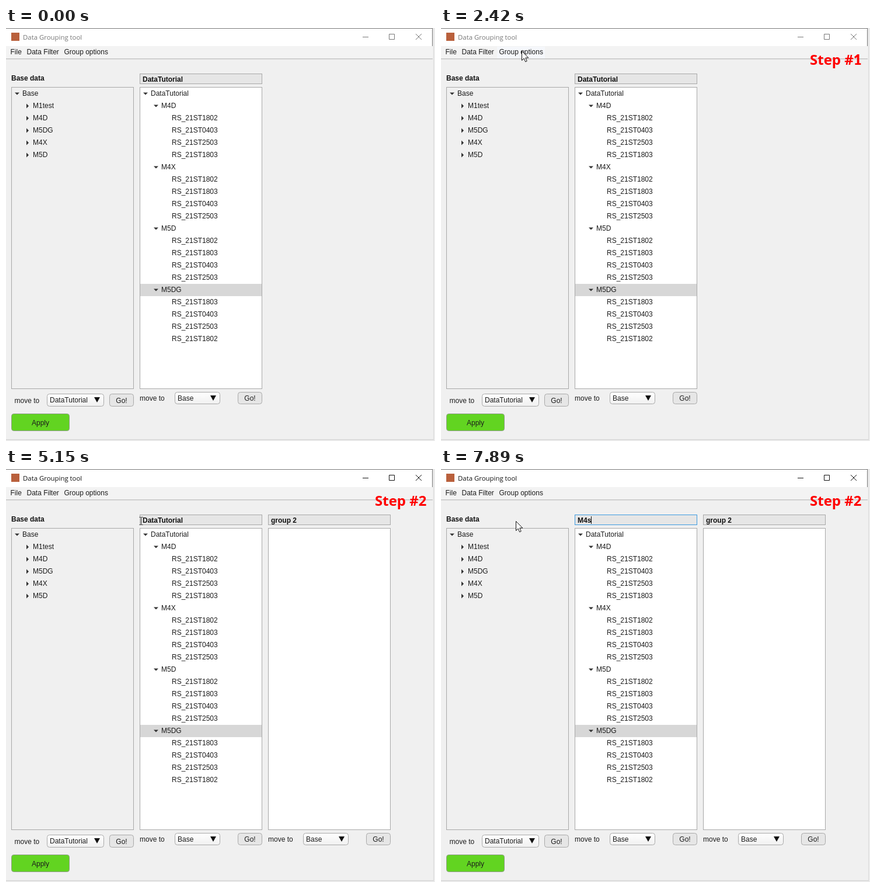
An HTML page that plays this animation: 735 by 707 pixels, repeating every 8 s.

```html
<!DOCTYPE html>
<html lang="en">
<head>
<meta charset="utf-8">
<title>Data Grouping tool</title>
<style>
  html, body { margin: 0; width: 100%; height: 100%; overflow: hidden; background: #fff; }
  svg { display: block; width: 735px; height: 707px; }
  text { font: 12px "Liberation Sans", Arial, sans-serif; fill: #1c1c1c; white-space: pre; }
  .bold { font-weight: bold; fill: #111; }
  .title { font: 11.4px "Open Sans", "Noto Sans", sans-serif; }
  .step { font: bold 24px "Open Sans", "Noto Sans", sans-serif; fill: #f00; }
  .foot { font-family: Lato, sans-serif; font-weight: 900; }
</style>
</head>
<body>
<svg id="stage" viewBox="0 0 735 707">
  <defs>
    <linearGradient id="side"><stop stop-color="#cfcfcf"/><stop offset="1" stop-color="#f6f6f6"/></linearGradient>
    <linearGradient id="under" x2="0" y2="1"><stop stop-color="#cfcfcf"/><stop offset="1" stop-color="#f6f6f6"/></linearGradient>
    <linearGradient id="drop" x2="0" y2="1"><stop stop-color="#fff"/><stop offset="1" stop-color="#f0f0f0"/></linearGradient>
  </defs>
</svg>
<script>
const LOOP = 8000;
const stage = document.getElementById('stage');

function add(parent, tag, attrs, content) {
  const el = document.createElementNS('http://www.w3.org/2000/svg', tag);
  for (const key in attrs) el.setAttribute(key, attrs[key]);
  if (content !== undefined) el.textContent = content;
  parent.appendChild(el);
  return el;
}
const group = (parent = stage) => add(parent, 'g', {});
const rect = (p, x, y, width, height, fill, extra) =>
  add(p, 'rect', { x, y, width, height, fill, ...extra });
const frame = (p, x, y, w, h, fill, stroke, rx = 0) =>
  rect(p, x + .5, y + .5, w - 1, h - 1, fill, { stroke, rx });
const label = (p, x, y, content, cls = '', extra) =>
  add(p, 'text', { x, y, class: cls, ...extra }, content);
const path = (p, d, extra) => add(p, 'path', { d, ...extra });
const show = (el, on) => el.setAttribute('visibility', on ? 'visible' : 'hidden');

// Window
rect(stage, 731, 0, 4, 707, 'url(#side)');
rect(stage, 0, 704, 733, 3, 'url(#under)');
rect(stage, 0, 0, 732, 704, '#f0f0f0');
rect(stage, 0, 0, 731, 31, '#fff');
rect(stage, 0, 0, 731, 1, '#777');
rect(stage, 730, 0, 1, 31, '#777');
rect(stage, 0, 31, 731, 21, '#f3f3f3');
rect(stage, 0, 52, 731, 1.5, '#c6c6c6');
rect(stage, 9, 8, 14, 14, '#b9603c');
const title = label(stage, 29, 20, 'Data Grouping tool', 'title');
const controls = path(stage, 'M611 15.5H621M656.5 10.5H665.5V19.5H656.5ZM702 10L712 20M712 10L702 20', { fill: 'none' });

// Menu bar
const menuHover = rect(stage, 96, 32, 82, 20, '#f5f7fb');
const menuOpen = rect(stage, 96, 31, 83, 21, '#a5d8fb');
label(stage, 7.5, 45, 'File');
label(stage, 35.5, 45, 'Data Filter');
label(stage, 99.5, 45, 'Group options');

// Trees
const rowMid = i => 112 + 21 * i;
function node(p, x, i, name, open) {
  const y = rowMid(i);
  if (open !== undefined) {
    const d = open ? `M${x - 13} ${y - 1.5}h8l-4 4z` : `M${x - 11} ${y - 3.5}v8l4 -4z`;
    path(p, d, { fill: '#333' });
  }
  label(p, x, y + 4, name);
}

function dropdown(p, x, y, w, h, name) {
  frame(p, x, y, w, h, 'url(#drop)', '#a9a9a9', 4);
  label(p, x + 5, y + 14.5, name);
  path(p, `M${x + w - 17} ${y + 6}h10l-5 9z`, { fill: '#111' });
}
function button(p, x, y, w, h, name, fill, stroke) {
  frame(p, x, y, w, h, fill, stroke, 4);
  label(p, x + w / 2, y + h / 2 + 4.5, name, '', { 'text-anchor': 'middle' });
}
function groupPanel(p, x) {
  const field = frame(p, x, 78, 210, 18, '#e6e6e6', '#a8a8a8');
  frame(p, x, 101, 210, 517, '#fff', '#a8a8a8');
  label(p, x, 638, 'move to');
  dropdown(p, x + 60, 623, 78, 21, 'Base');
  button(p, x + 168, 623, 42, 21, 'Go!', '#e6e6e6', '#a9a9a9');
  return field;
}

label(stage, 9, 90, 'Base data', 'bold');
frame(stage, 9, 101, 210, 517, '#f0f0f0', '#a8a8a8');
label(stage, 14.5, 642, 'move to');
dropdown(stage, 70, 626, 98, 22, 'DataTutorial');
button(stage, 177, 626, 42, 22, 'Go!', '#e6e6e6', '#a9a9a9');
button(stage, 9, 660, 100, 30, 'Apply', '#62d421', '#8f9d88');

const field = groupPanel(stage, 229);
rect(stage, 230, 438, 208, 21, '#d7d7d7');
const hover = rect(stage, 0, 0, 208, 21, '#e4e4e4');

node(stage, 28, 0, 'Base', true);
['M1test', 'M4D', 'M5DG', 'M4X', 'M5D'].forEach((name, i) => node(stage, 46, i + 1, name, false));

const sets = {
  M4D: ['1802', '0403', '2503', '1803'],
  M4X: ['1802', '1803', '0403', '2503'],
  M5D: ['1802', '1803', '0403', '2503'],
  M5DG: ['1803', '0403', '2503', '1802']
};
let row = 0;
node(stage, 248, row++, 'DataTutorial', true);
for (const name in sets) {
  node(stage, 266, row++, name, true);
  for (const id of sets[name]) node(stage, 284, row++, 'RS_21ST' + id);
}

// Name field
const selection = rect(stage, 0, 80, 0, 14, '#3390ff');
const fieldText = label(stage, 234, 92, '', 'bold');
const caret = rect(stage, 0, 81, 1, 13, '#111');

const second = group();
groupPanel(second, 449);
label(second, 454, 92, 'group 2', 'bold');

// Drop-down menu
const menu = group();
rect(menu, 98, 54, 157, 84, '#000', { opacity: .1 });
rect(menu, 97, 53, 157, 84, '#000', { opacity: .14 });
frame(menu, 95, 51, 158, 85, '#f2f2f2', '#bdbdbd');
const itemHover = frame(menu, 96, 52, 156, 27, '#a5d8fd', '#2f9be6');
['add new group', 'remove group', 'erase group content'].forEach((name, i) => {
  label(menu, 131, 71 + 27 * i, name);
  if (i) path(menu, `M242 ${64 + 27 * i}v6l3.5 -3z`, { fill: '#111' });
});

// Step labels
const steps = [1, 2].map(n => {
  const el = label(stage, 632, 63, 'Step #', 'step');
  add(el, 'tspan', n === 1 ? { class: 'foot' } : {}, String(n));
  return el;
});

// Pointers
const arrow = path(stage, 'M.5 .5V16.5L4.2 13L6.6 18.8L9.2 17.7L6.8 12H11.8Z',
  { fill: '#fff', stroke: '#111' });
const beam = path(stage, 'M-3 -6.5H-1L0 -6L1 -6.5H3M0 -6V6M-3 6.5H-1L0 6L1 6.5H3',
  { fill: 'none', stroke: '#222' });

// Each move: points of [time, x, y]
const moves = [
  [[1310, 300, 690], [1450, 276, 545], [1590, 255, 390], [1730, 243, 302], [1870, 205, 228], [2090, 164, 130]],
  [[2160, 156, 104], [2230, 146, 66], [2300, 139, 43], [2370, 138, 39], [2760, 139, 42]],
  [[3160, 137, 50], [3300, 131, 64], [3440, 133, 71]],
  [[3630, 133, 71], [4050, 139, 66]],
  [[4360, 170, 78], [4430, 189, 87]],
  [[4680, 194, 88]],
  [[5010, 202, 88], [5430, 290, 90], [5710, 331, 91]],
  [[5970, 333, 92]],
  [[6230, 300, 91], [6300, 245, 90], [6370, 170, 89], [6440, 128, 89]]
];

function pointerAt(t) {
  const move = moves.filter(m => m[0][0] <= t).pop();
  if (!move) return null;
  const start = move[0][0];
  const time = start + Math.floor((t - start) / 70) * 70;
  const next = move.findIndex(k => k[0] > time);
  if (next < 0) return move[move.length - 1].slice(1);
  const a = move[next - 1], b = move[next];
  const f = (time - a[0]) / (b[0] - a[0]);
  return [a[1] + (b[1] - a[1]) * f, a[2] + (b[2] - a[2]) * f].map(Math.round);
}

// Row highlighting trails the pointer slightly
function drawHover(t) {
  const p = t < 2300 && pointerAt(t - 30);
  let on = false;
  if (p) {
    const right = p[0] > 229;
    const i = Math.floor((p[1] - 102) / 21);
    on = i >= 0 && i < (right ? 21 : 6) && i !== (right ? 16 : -1) && (right || p[0] < 219);
    hover.setAttribute('x', right ? 230 : 10);
    hover.setAttribute('y', rowMid(i) - 10);
  }
  show(hover, on);
}

const typed = [[0, 'DataTutorial', 303], [7240, 'M', 244], [7640, 'M4', 251], [7890, 'M4s', 257]];

function draw(t) {
  const active = t >= 2560;
  title.style.fill = active ? '#111' : '#777';
  controls.setAttribute('stroke', active ? '#111' : '#777');

  const open = t >= 2690 && t < 3630;
  show(menuHover, t >= 2300 && t < 2690);
  show(menuOpen, open);
  show(menu, open);
  show(itemHover, open && t >= 3230);
  show(second, t >= 4290);
  show(steps[0], t >= 1310 && t < 5010);
  show(steps[1], t >= 5010);
  drawHover(t);

  const p = pointerAt(t);
  const inField = p && t >= 5010 && p[0] > 229;
  show(arrow, p && !inField);
  show(beam, inField);
  if (p) {
    arrow.setAttribute('transform', `translate(${p[0]} ${p[1]})`);
    beam.setAttribute('transform', `translate(${p[0] + .5} ${p[1]})`);
  }

  const focus = t >= 5770;
  field.setAttribute('stroke', focus ? '#3d9be0' : '#a8a8a8');
  const [, value, end] = typed.filter(k => k[0] <= t).pop();
  if (fieldText.textContent !== value) fieldText.textContent = value;

  const dragging = t >= 6230 && t < 7240;
  const from = dragging ? Math.max(234, Math.min(304, p[0])) : 304;
  selection.setAttribute('x', from);
  selection.setAttribute('width', 304 - from);
  fieldText.style.fill = dragging && from === 234 ? '#fff' : '#111';
  caret.setAttribute('x', end);
  show(caret, focus && !dragging);
}

const begin = performance.now();
function tick() {
  draw((performance.now() - begin) % LOOP);
  requestAnimationFrame(tick);
}
tick();
</script>
</body>
</html>
```
